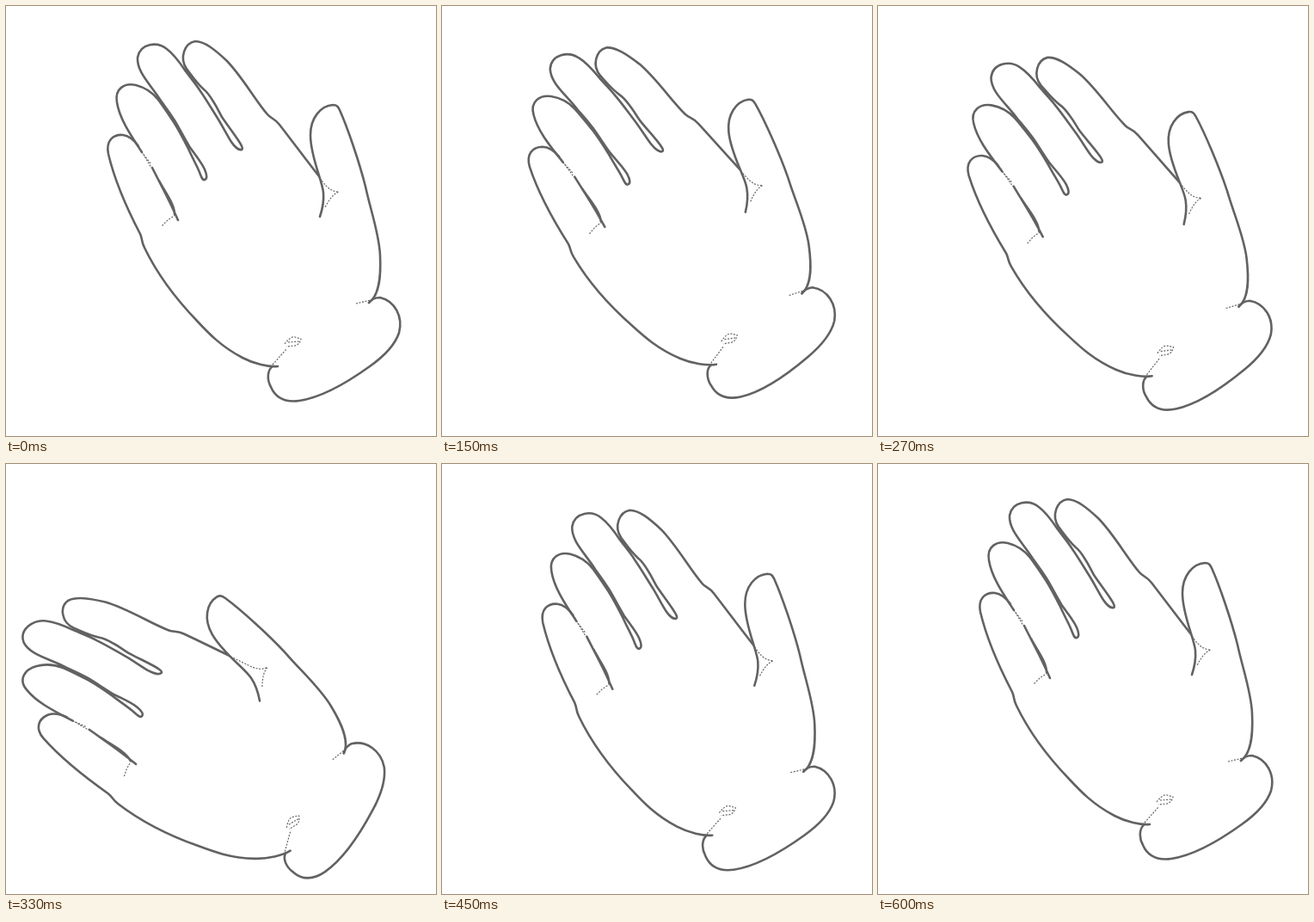
An HTML page that plays this animation: 500 by 500 pixels, repeating every 690 ms.

```html
<!DOCTYPE html>
<html lang="en">
<head>
<meta charset="utf-8">
<title>Waving hand</title>
<style>
  html, body { margin: 0; width: 100%; height: 100%; overflow: hidden; background: #fff; }
  svg { display: block; width: 100vw; height: 100vh; }
  path { fill: none; stroke: #626262; stroke-width: 2.6; stroke-linecap: round; stroke-linejoin: round; }
  .thumb { fill: #fff; }
  .seam { stroke: #666; stroke-width: 1.2; stroke-dasharray: 2 1.6; stroke-linecap: butt; }
</style>
</head>
<body>
<svg id="stage" viewBox="0 0 500 500"></svg>
<script>
const LOOP = 690, STEP = 30, END = 600;
const PIVOT = [360, 400];      // centre of the wrist
const THUMB_ROOT = [422, 345];
const REACH = 385;             // wrist to middle fingertip

// time, rotation in degrees, x shift, y shift
const KEYS = [
  [0, 0, 0, 0],
  [90, -28.2, 1.4, -9.9],
  [210, 18.8, 1, 1],
  [330, -26.3, 1.6, 13.1],
  [450, 0, -1.7, 12.7],
  [495, 8, -1.3, 10.6],
  [540, 0, -0.8, 7.6],
  [600, 0, 0, 0]
];

const SHAPES = [
  // palm edge and little finger
  ["line", "M316 419 C306 420 288 416 275 409 C250 396 235 380 222 366 C196 339 174 308 161 281 C157 273 159 272 156 265 C144 242 127 206 119 172 C116 157 124 149 136 150 C144 151 149 156 154 163"],
  ["line", "M170 188 C178 204 188 222 195 238 L200 249 M178 203 C184 215 196 230 196 242"],
  // ring, middle and index fingers
  ["line", "M158 170 C147 153 132 132 129 112 C126 96 138 89 151 92 C163 95 170 100 177 109 C183 117 189 126 195 135 C202 146 207 156 212 166 C217 177 221 184 224 191 C227 198 228 203 231 202 C234 201 234 197 231 190 C227 181 219 172 213 163 C207 153 202 143 196 133 C189 122 185 117 180 110 C168 91 152 77 153 60 C156 43 176 41 187 50 C195 56 203 67 209 76 C215 84 221 91 226 99 C233 109 240 121 247 132 C253 142 258 152 262 158 C266 164 271 168 274 167 C276 166 274 162 270 156 C264 147 257 138 251 129 C247 122 245 117 241 111 C238 106 234 100 230 97 C222 90 216 81 210 73 C201 60 208 43 220 41 C231 41 243 51 256 63 C274 81 290 110 304 126 C308 131 313 131 318 138 C335 160 352 183 368 203 L373 210"],
  ["thumb", "M365 245 C367 239 370 228 369 217 C368 203 354 176 354 150 C354 130 366 116 380 115 C385 115 386 117 388 121 C397 141 411 182 418 210 C424 238 434 265 435 290 C436 312 435 336 422 345"],
  // cuff
  ["line", "M310 419 C304 423 303 434 308 443 C314 457 326 461 341 459 C368 455 398 437 423 419 C440 407 452 395 457 380 C462 361 452 343 435 339 C429 339 425 341 422 345"],
  // broken seams
  ["seam", "M154 163 L169 188 M158 170 L168 183"],
  ["seam", "M197 243 L188 249 L181 256"],
  ["seam", "M352 183 L368 204 C374 212 379 216 387 216 C380 219 376 225 371 234"],
  ["seam", "M407 346 L424 342"],
  ["seam", "M310 417 L326 399 M324 393 C328 388 332 384 336 385 L343 387 C342 391 340 394 336 395 L326 396 M328 391 L341 390"]
];

const stage = document.getElementById("stage");
const parts = SHAPES.map(([kind, d]) => {
  const el = document.createElementNS("http://www.w3.org/2000/svg", "path");
  el.setAttribute("class", kind);
  stage.append(el);
  return { el, kind, d };
});

function rotate([x, y], [cx, cy], deg) {
  const a = deg * Math.PI / 180, c = Math.cos(a), s = Math.sin(a);
  const dx = x - cx, dy = y - cy;
  return [cx + dx * c - dy * s, cy + dx * s + dy * c];
}

const slope = (i, k) => (KEYS[i + 1][k] - KEYS[i][k]) / (KEYS[i + 1][0] - KEYS[i][0]);

// Flat at turning points, averaged elsewhere
function tangent(i, k) {
  if (i === 0 || i === KEYS.length - 1) return 0;
  const a = slope(i - 1, k), b = slope(i, k);
  return a * b > 0 ? 2 * a * b / (a + b) : 0;
}

function valueAt(t, k) {
  let i = 0;
  while (i < KEYS.length - 2 && t >= KEYS[i + 1][0]) i++;
  const span = KEYS[i + 1][0] - KEYS[i][0];
  const u = (t - KEYS[i][0]) / span, v = 1 - u;
  return KEYS[i][k] * v * v * (1 + 2 * u) + KEYS[i + 1][k] * u * u * (3 - 2 * u)
    + span * u * v * (tangent(i, k) * v - tangent(i + 1, k) * u);
}

function draw(t) {
  const [rot, dx, dy] = [1, 2, 3].map(k => valueAt(t, k));
  // Fingers lean a little further than the palm, the thumb further still
  const pose = (p, kind) => {
    if (kind === "thumb") p = rotate(p, THUMB_ROOT, rot * 0.08);
    const far = Math.hypot(p[0] - PIVOT[0], p[1] - PIVOT[1]) / REACH;
    const [x, y] = rotate(p, PIVOT, rot * (1 + 0.043 * far ** 4));
    return (x + dx).toFixed(2) + " " + (y + dy).toFixed(2);
  };
  for (const { el, kind, d } of parts) {
    el.setAttribute("d", d.replace(/(\d+) (\d+)/g, (_, x, y) => pose([+x, +y], kind)));
  }
}

const start = performance.now();
function tick() {
  const t = (performance.now() - start) % LOOP;
  draw(Math.min(END, Math.floor(t / STEP) * STEP));
  requestAnimationFrame(tick);
}
tick();
</script>
</body>
</html>
```
